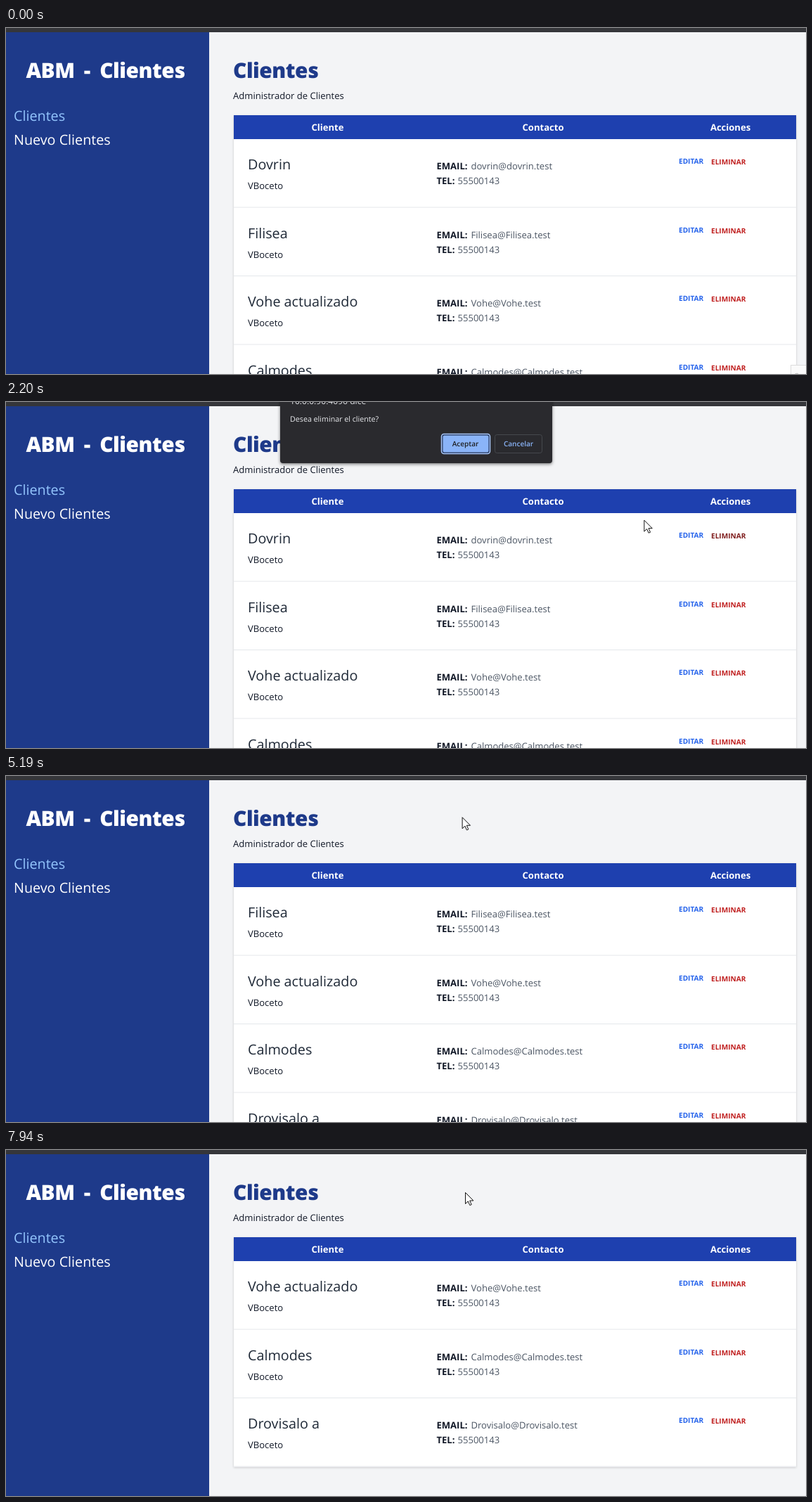
Animation of 1138 by 492 pixels, one loop 8000 ms. Source, as an HTML page:

```html
<!DOCTYPE html>
<html lang="es">
<head>
<meta charset="utf-8">
<title>Clientes</title>
<style>
  html, body { margin: 0; width: 100%; height: 100%; overflow: hidden; background: #f3f4f6; }
  svg { display: block; width: 1138px; height: 492px; }
  text { font: 13.05px "Open Sans", "Noto Sans", sans-serif; fill: #111827; text-rendering: geometricPrecision; white-space: pre; }
  .title { font-size: 29.8px; font-weight: 800; letter-spacing: -.45px; word-spacing: 6px; }
  .large { font-size: 19.75px; }
  .bold { font-weight: 700; }
  .mid { text-anchor: middle; }
  .white { fill: #fff; }
  .soft { fill: #4b5563; }
  .action { font-size: 10.1px; font-weight: 700; }
  .button { font-size: 10px; font-weight: 600; text-anchor: middle; }
  .pointer { fill: #fff; stroke: #111; stroke-linejoin: round; }
</style>
</head>
<body>
<svg viewBox="0 0 1138 492">
  <defs>
    <filter id="tableShadow" x="-5%" y="-5%" width="110%" height="115%">
      <feDropShadow dx="0" dy="1" stdDeviation="1.5" flood-opacity=".2"/>
    </filter>
    <filter id="dialogShadow" x="-5%" y="-10%" width="110%" height="130%">
      <feDropShadow dx="0" dy="1.5" stdDeviation="2" flood-opacity=".5"/>
    </filter>
  </defs>
  <rect width="1138" height="492" fill="#f3f4f6"/>
  <rect width="289" height="492" fill="#1e3a8a"/>
  <rect width="1138" height="6" fill="#35363a"/>
  <text class="title white mid" x="141.5" y="71">ABM - Clientes</text>
  <text class="large" x="11" y="132" style="fill:#93c5fd">Clientes</text>
  <text class="large white" x="11" y="166">Nuevo Clientes</text>
  <text class="title" x="323" y="71" style="fill:#1e3a8a">Clientes</text>
  <text x="323" y="101">Administrador de Clientes</text>

  <rect id="table" x="324" y="124" width="800" fill="#fff" filter="url(#tableShadow)"/>
  <rect x="324" y="124" width="800" height="34" fill="#1e40af"/>
  <text class="bold white mid" x="457.5" y="146">Cliente</text>
  <text class="bold white mid" x="764" y="146">Contacto</text>
  <text class="bold white mid" x="1030.5" y="146">Acciones</text>
  <g id="rows"></g>

  <g id="tip">
    <rect x="1116.5" y="479.5" width="30" height="20" fill="#fafafa" stroke="#dcdcdc"/>
    <text x="1121" y="498" style="font-size:10px;fill:#aaa">Car</text>
  </g>

  <g id="dialog">
    <rect x="390" y="-30" width="387" height="117" rx="4" fill="#292a2d" filter="url(#dialogShadow)"/>
    <text x="404" y="3" style="font-size:12.1px;fill:#e8eaed">10.0.0.90:4096 dice</text>
    <text x="404" y="28" style="font-size:10.7px;fill:#e8eaed">Desea eliminar el cliente?</text>
    <rect x="619.5" y="45.5" width="69" height="28" rx="3.5" fill="#23355a" stroke="#a9c8fa" stroke-width="1.5"/>
    <rect x="621.5" y="47.5" width="65" height="24" rx="2" fill="#8ab4f8"/>
    <text class="button" x="653.5" y="63" style="fill:#202124">Aceptar</text>
    <rect x="695.5" y="46.5" width="67" height="26" rx="3" fill="none" stroke="#45484d"/>
    <text class="button" x="729" y="63" style="fill:#8ab4f8">Cancelar</text>
  </g>

  <path id="arrow" class="pointer" d="M.5.5v16l3.8-3.6 2.5 5.7 2.4-1-2.5-5.6h5.2z"/>
  <g id="hand">
    <path class="pointer" transform="scale(1.06)" d="M-1.5 11.5V1.5Q-1.5 0 0 0T1.5 1.5V7Q1.5 6 2.9 6T4.3 7.2Q4.6 6.4 5.6 6.4T6.9 7.5Q7.2 6.9 8.1 7T9 8.5V12.5Q9 14.5 7.5 16.5V19H0V17L-4.4 12.1Q-5.4 10.4-4.1 10T-1.5 11.5zM1.5 7v4M4.3 7.2v4M6.9 7.5v4"/>
  </g>
</svg>
<script>
const LOOP = 8000, ROW = 97.5;
const $ = id => document.getElementById(id);

const clients = [
  ["Dovrin", "dovrin"],
  ["Filisea", "Filisea"],
  ["Vohe actualizado", "Vohe"],
  ["Calmodes", "Calmodes"],
  ["Drovisalo a", "Drovisalo"]
];

// Pointer tip: time, x, y
const path = [
  [460, 1095, 486], [1260, 1034, 195], [1940, 1034, 195],
  [2550, 738, 131], [3110, 657, 75], [3390, 648, 60], [3520, 648, 58],
  [5190, 648, 58], [5800, 1015, 217], [5950, 1023, 199], [6090, 1029.5, 195],
  [6440, 1029.5, 195], [7060, 655, 77], [7260, 656, 70], [7600, 653, 60]
];
const handTimes = [[1330, 1940], [6020, 6440]];
const hoverTimes = [[1330, 3850], [6020, 7700]];
const dialogTimes = [[1895, 3720], [6400, 7600]];

const clamp = v => Math.max(0, Math.min(1, v));
const during = (t, spans) => spans.some(([a, b]) => t >= a && t < b);
const show = (el, on) => el.style.display = on ? "" : "none";

function rowMarkup([name, mail], i) {
  return `<g transform="translate(0 ${i * ROW})">
    <text class="large" x="344" y="201" style="fill:#1f2937">${name}</text>
    <text x="344" y="229">VBoceto</text>
    <text class="bold" x="612.5" y="201">EMAIL:</text>
    <text class="soft" x="661.5" y="201">${mail}@${mail}.test</text>
    <text class="bold" x="612.5" y="222">TEL:</text>
    <text class="soft" x="642.5" y="222">55500143</text>
    <text class="action" x="957" y="193" style="fill:#2563eb">EDITAR</text>
    <text class="action remove" x="1003" y="194" style="fill:#c02020">ELIMINAR</text>
    <path d="M324 255H1124" stroke="#e5e7eb"/>
  </g>`;
}

let removedShown = -1;
function drawRows(removed) {
  if (removed === removedShown) return;
  removedShown = removed;
  const list = clients.slice(removed);
  $("rows").innerHTML = list.map(rowMarkup).join("");
  $("table").setAttribute("height", 34 + list.length * ROW);
}

function pointerAt(t) {
  const i = path.findIndex(p => p[0] > t);
  if (i < 0) return path[path.length - 1].slice(1);
  if (i === 0) return path[0].slice(1);
  const [t0, x0, y0] = path[i - 1], [t1, x1, y1] = path[i];
  const k = (t - t0) / (t1 - t0);
  return [x0 + (x1 - x0) * k, y0 + (y1 - y0) * k];
}

function draw(t) {
  drawRows(t < 4260 ? 0 : t < 7870 ? 1 : 2);
  document.querySelector(".remove").style.fill = during(t, hoverTimes) ? "#7f1d1d" : "#c02020";
  show($("tip"), t < 70);

  const opacity = Math.max(...dialogTimes.map(([open, close]) =>
    Math.min(clamp((t - open) / 200), clamp(1 - (t - close) / 330))));
  $("dialog").setAttribute("opacity", opacity);
  $("dialog").setAttribute("transform", `translate(0 ${-15 * (1 - opacity ** 1.5)})`);

  const isHand = during(t, handTimes);
  show($("arrow"), t >= 460 && !isHand);
  show($("hand"), isHand);
  const [x, y] = pointerAt(t);
  $(isHand ? "hand" : "arrow").setAttribute("transform", `translate(${x} ${y})`);
}

const start = performance.now();
function tick() {
  draw((performance.now() - start) % LOOP);
  requestAnimationFrame(tick);
}
tick();
</script>
</body>
</html>
```
